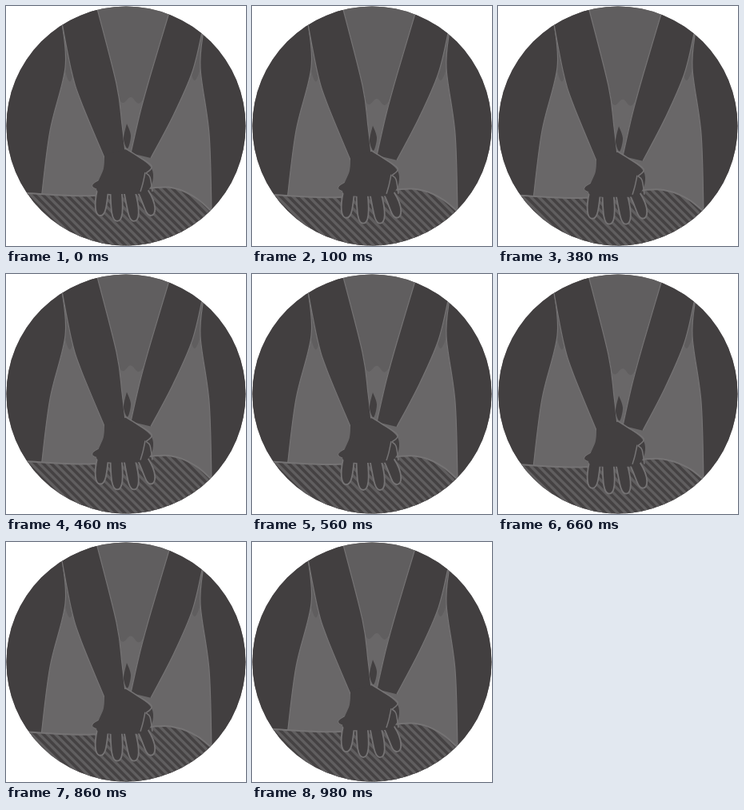
An HTML page with a canvas for the animation above (1000 ms loop, 300x300 px).

```html
<!DOCTYPE html>
<html lang="en">
<head>
<meta charset="utf-8">
<title>Chest compressions</title>
<style>
html, body { margin: 0; width: 100%; height: 100%; overflow: hidden; background: #fff; }
canvas { display: block; width: 300px; height: 300px; }
</style>
</head>
<body>
<canvas id="stage" width="300" height="300"></canvas>
<script>
const ctx = document.getElementById('stage').getContext('2d');
const DARK = '#423f40', MID = '#696768', SHIRT = '#605e5f', LINE = '#757374';
const STRIPE = '#605e5f', GROUND = '#454243';
const BEAT = 500, STEP = 20, DEPTH = 8, FINGERS = 4;

// Smooth curve through points
function curve(pts, join) {
  if (join) ctx.lineTo(...pts[0]); else ctx.moveTo(...pts[0]);
  for (let i = 0; i < pts.length - 1; i++) {
    const a = pts[i - 1] || pts[i], b = pts[i], c = pts[i + 1], d = pts[i + 2] || c;
    ctx.bezierCurveTo(b[0] + (c[0] - a[0]) / 6, b[1] + (c[1] - a[1]) / 6,
      c[0] - (d[0] - b[0]) / 6, c[1] - (d[1] - b[1]) / 6, ...c);
  }
}

function fill(color, ...parts) {
  ctx.beginPath();
  parts.forEach((p, i) => curve(p, i > 0));
  ctx.closePath();
  ctx.fillStyle = color;
  ctx.fill();
}

function stroke(pts, width = 1.2) {
  ctx.beginPath();
  curve(pts);
  ctx.strokeStyle = LINE;
  ctx.lineWidth = width;
  ctx.stroke();
}

function thigh(edge, side) {
  fill(DARK, edge, [[side, 310], [side, -10]]);
  stroke(edge);
}

function arm(outer, inner) {
  fill(DARK, outer, [...inner].reverse());
  stroke(outer);
  stroke(inner);
}

function chest(press) {
  const sink = 6 * press;
  const top = [[26, 234 + sink], [109, 237 + sink], [186, 227 + sink],
    [215, 229 + sink], [239, 241 + sink / 2], [257, 257]];
  const base = [[257, 310], [26, 310]];
  fill(GROUND, top, base);
  ctx.save();
  ctx.clip();
  ctx.strokeStyle = STRIPE;
  ctx.lineWidth = 3.4;
  ctx.beginPath();
  for (let x = -70; x < 270; x += 10) {
    ctx.moveTo(x, 215 + sink);
    ctx.lineTo(x + 95, 310 + sink);
  }
  ctx.stroke();
  ctx.restore();
  stroke(top, 2);
}

function finger(i, drop) {
  const bx = 121 + 16.5 * i, by = 230 + drop, tx = 118 + 21 * i;
  const ty = 262 + 8 * Math.sin(Math.PI * i / (FINGERS - 1)) + drop;
  ctx.beginPath();
  ctx.moveTo(bx - 7, by);
  ctx.bezierCurveTo(tx - 8, ty - 14, tx - 7, ty, tx, ty);
  ctx.bezierCurveTo(tx + 7, ty, tx + 8, ty - 14, bx + 7, by);
  ctx.fillStyle = DARK;
  ctx.fill();
  ctx.strokeStyle = LINE;
  ctx.lineWidth = 1.8;
  ctx.stroke();
}

function hand(move, drop) {
  const back = move([[119, 216], [109, 222], [109, 227], [120, 231]]);
  fill(DARK, back);
  stroke(back, 1);
  for (let i = 0; i < FINGERS; i++) finger(i, drop);
  fill(DARK, move([[123, 186], [122, 203], [114, 231], [145, 235], [177, 231],
    [182, 203], [150, 179]]));
  stroke(move([[149, 178], [162, 186], [182, 200], [175, 209]]), 1.5);
  stroke(move([[175, 209], [180, 214], [183, 232]]), 1.5);
  stroke(move([[174, 208], [171, 222], [168, 232]]), 1.5);
}

function draw(time) {
  const press = (1 - Math.cos(2 * Math.PI * time / BEAT)) / 2;
  const drop = DEPTH * press;
  // Shoulders travel less than the wrists
  const move = pts => pts.map(([x, y]) => [x, y + drop * Math.min(1, 0.4 + 0.6 * y / 190)]);

  ctx.clearRect(0, 0, 300, 300);
  ctx.save();
  ctx.beginPath();
  ctx.arc(150, 150, 149.5, 0, 2 * Math.PI);
  ctx.clip();
  ctx.fillStyle = MID;
  ctx.fillRect(0, 0, 300, 300);

  fill(SHIRT, move([[100, -20], [138, 110], [156, 114], [174, 111], [215, -20]]));
  fill(SHIRT, [[60, 0], [73, 78], [83, 88], [90, 0]]);
  fill(SHIRT, [[256, 0], [243, 78], [232, 86], [226, 0]]);
  thigh([[70, 20], [74, 77], [55, 156], [44, 242]], -10);
  thigh([[247, 30], [243, 78], [254, 160], [257, 260]], 310);
  chest(press);

  arm(move([[246, 28], [233, 82], [209, 137], [181, 190]]),
    move([[208, -5], [181, 85], [168, 132], [156, 184]]));
  arm(move([[69, 16], [82, 82], [94, 120], [124, 192]]),
    move([[111, -8], [138, 97], [145, 148], [149, 182]]));
  fill(DARK, move([[151, 147], [156, 162], [152, 178], [147, 166], [151, 147]]));
  hand(move, drop);
  ctx.restore();
}

function tick() {
  draw(Math.floor(performance.now() / STEP) * STEP);
  requestAnimationFrame(tick);
}
tick();
</script>
</body>
</html>
```
